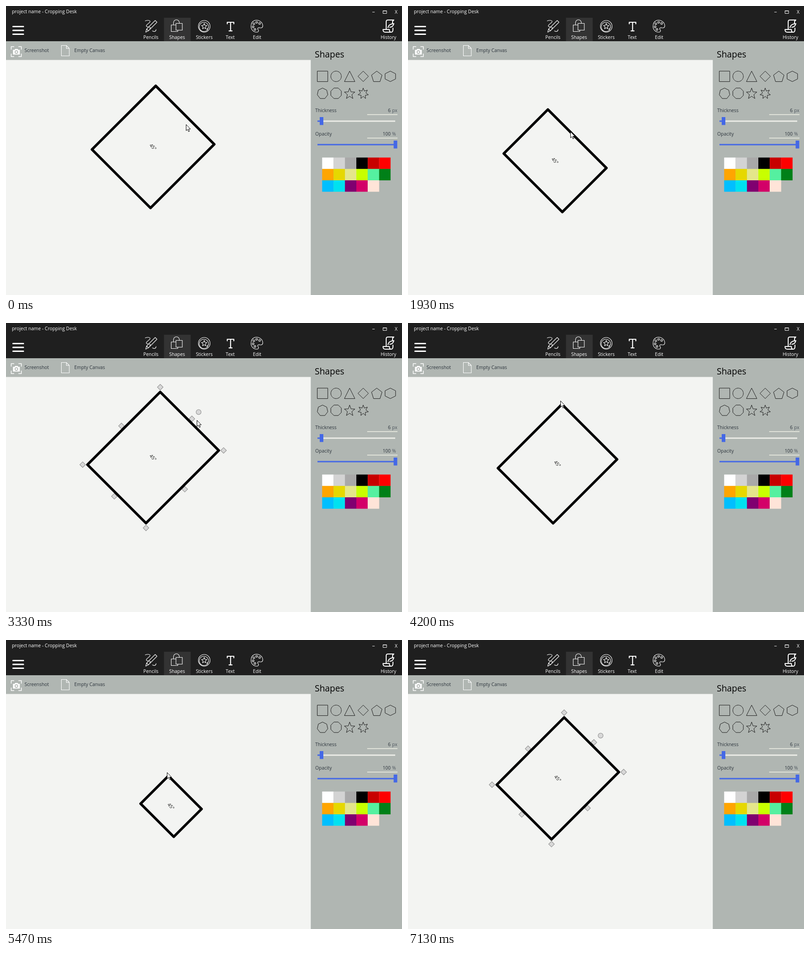
Recreate the animation shown at these times as an HTML page. Size 876 px wide and 640 px high, loop 7540 ms.

```html
<!DOCTYPE html>
<html lang="en">
<head>
<meta charset="utf-8">
<title>Shape editor</title>
<style>
html, body { margin: 0; width: 100%; height: 100%; overflow: hidden; background: #f3f4f2; }
svg { display: block; width: 876px; height: 640px; }
text { font: 10.4px "Open Sans", "Noto Sans", sans-serif; }
.mid { text-anchor: middle; }
.end { text-anchor: end; }
.white { fill: #fff; }
.dark { fill: #2c343c; }
.icon { fill: none; stroke: #fff; stroke-width: 1.1; stroke-linecap: round; stroke-linejoin: round; }
</style>
</head>
<body>
<svg viewBox="0 0 876 640">
  <rect width="876" height="640" fill="#f3f4f2"/>

  <g id="handles" fill="#d8d8d8" stroke="#8a8a8a"></g>
  <rect id="box" fill="#f3f4f2" stroke="#000" stroke-width="5.7" stroke-linejoin="round"/>
  <text id="angle" class="mid" y="4" fill="#111">45°</text>

  <path d="M0 78H876V640H674.200V119.500H0Z" fill="#b0b6b2"/>
  <rect width="876" height="78" fill="#1f1f1f"/>
  <rect x="349.500" y="26" width="59" height="52" fill="#333"/>

  <g class="white">
    <text x="13" y="16">project name - Cropping Desk</text>
    <g class="mid">
      <text x="320.5" y="73">Pencils</text>
      <text x="378.5" y="73">Shapes</text>
      <text x="438.5" y="73">Stickers</text>
      <text x="496" y="73">Text</text>
      <text x="555.5" y="73">Edit</text>
      <text x="846" y="73">History</text>
      <text x="863" y="17">X</text>
    </g>
  </g>
  <path d="M810.5 13.5h5M834 10.5h8v6h-8zM834 11h8" fill="none" stroke="#fff"/>
  <path d="M15.500 45.500h23M15.500 54h23M15.500 62.500h23" stroke="#fff" stroke-width="3" stroke-linecap="round"/>

  <g class="icon">
    <!-- pencils -->
    <path d="M308 33c8-3 14 0 9 4s-10 8-4 9 8 1 5 4M309 58l2-7 19-19 4 4-19 19zM311 51l4 4M324 55c4 3 8 1 8-3"/>
    <!-- shapes -->
    <path d="M370.500 41v-4a6.500 6.500 0 0 1 13 0v1M376 38.500h14v15h-14zM375 42h-9.500v14.500h14.500v-3"/>
    <!-- stickers -->
    <circle cx="438.500" cy="45" r="13"/>
    <path d="M447 51a10.300 10.300 0 1 1 1-3l-4 4"/>
    <!-- text -->
    <path d="M489.500 39.500V36H504V39.500M496.800 36V55M493.500 55.200h6.500" stroke-width="2.200"/>
    <!-- palette -->
    <path d="M550 32c9-3 18 4 18 12 0 5-4 5-8 4-4 0-4 3-2 5s0 5-3 5c-8 0-13-6-13-13 0-6 3-11 8-13z"/>
    <!-- history -->
    <path d="M841 51V35q0-4 4-4h13q-3 1-3 5v4M834 52h14q0 6 4 6t4-6v-3M834 52q0 6 5 6h13M845 48q1-8 13-9-2 8-9 8" stroke-width="2"/>
    <!-- screenshot -->
    <path d="M11.500 96v-6h6M28 90h6v6M34 106v6h-6M17.500 112h-6v-6" stroke-width="1.500"/>
    <!-- file -->
    <path d="M122.500 87.500h11l6.500 6.500v16.500h-17.500zM133.500 87.500v6.500h6.500"/>
  </g>
  <g id="icons" class="icon"></g>
  <path d="M15.500 97h3.500l1.500-2h5l1.500 2h3.500v10.500h-15z" fill="#fff"/>
  <circle cx="23" cy="102" r="3" fill="#fff" stroke="#a4aaa6" stroke-width="1.300"/>

  <g class="dark">
    <text x="41" y="102">Screenshot</text>
    <text x="151" y="102">Empty Canvas</text>
    <text x="684" y="234.500">Thickness</text>
    <text x="684" y="286.500">Opacity</text>
    <text x="851" y="234.500" class="end">6</text>
    <text x="851" y="286.500" class="end">100</text>
    <text x="854" y="234.500" fill="#505860">px</text>
    <text x="854" y="286.500" fill="#505860">%</text>
  </g>
  <text x="683" y="113.500" style="font-size:19.400px">Shapes</text>
  <g id="shapes" fill="none" stroke="#1a1a1a"></g>

  <path d="M799 240.500h67M799 292.500h67" stroke="#f1f2e6" stroke-width="1.500"/>
  <path d="M698 255h163" stroke="#ecede8" stroke-width="3"/>
  <path d="M689 255h6M689 307h170" stroke="#4468e6" stroke-width="3"/>
  <path d="M694 246h8v17.500h-8zM857.500 298h8v17.500h-8z" fill="#4468e6"/>
  <g id="swatches"></g>

  <path id="cursor" d="M.5.5V14l3.100-2.800 2.200 5 2.200-1-2.200-4.700H10z" fill="#fff" stroke="#000"/>
</svg>
<script>
const $ = id => document.getElementById(id);

function set(el, attrs) {
  for (const k in attrs) el.setAttribute(k, attrs[k]);
}
function add(parent, tag, attrs) {
  const el = document.createElementNS("http://www.w3.org/2000/svg", tag);
  set(el, attrs);
  return parent.appendChild(el);
}

// Polygon or star stretched to fill a square; turn is a part of one corner step.
function polygon(parent, cx, cy, size, n, { inner = 1, turn = 0 } = {}) {
  const count = inner < 1 ? 2 * n : n;
  const axes = [Math.sin, a => -Math.cos(a)].map((fn, axis) => {
    const v = Array.from({ length: count }, (_, i) =>
      (i % 2 ? inner : 1) * fn(2 * Math.PI * (i + turn) / count));
    const min = Math.min(...v), max = Math.max(...v);
    return v.map(p => [cx, cy][axis] + size * ((p - min) / (max - min) - 0.5));
  });
  add(parent, "polygon", { points: axes[0].map((x, i) => [x, axes[1][i]]).join(" ") });
}

const shapes = [
  [4, { turn: 0.5 }], [60], [3], [4], [5], [6],
  [7], [8, { turn: 0.5 }], [5, { inner: 0.42 }], [7, { inner: 0.5 }]
];
shapes.forEach(([n, look], i) =>
  polygon($("shapes"), 700.2 + i % 6 * 30, i < 6 ? 155.8 : 193.3, 23.2, n, look));

polygon($("icons"), 438.5, 44.5, 12, 5, { inner: 0.45 });
for (let i = 0; i < 5; i++) {
  const a = 2.1 + i * 0.85;
  add($("icons"), "circle", { cx: 555 + 8.5 * Math.cos(a), cy: 44.5 + 8.5 * Math.sin(a), r: 2 });
}

const colors = `#fff #d3d3d3 #a9a9a9 #000 #c80000 #f00
  #ffa500 #e6d800 #e4e68a #c8ff00 #55f0a0 #008018
  #00bfff #00e1f0 #800070 #d30068 #ffe4d8`.split(/\s+/);
colors.forEach((fill, i) => add($("swatches"), "rect", {
  x: 699.4 + i % 6 * 25.2, y: 335.6 + Math.floor(i / 6) * 25.2,
  width: 25.3, height: 25.3, fill
}));

// Eight resize handles around the box, plus the round one for rotating.
const grips = [];
for (const i of [-1, 0, 1]) for (const j of [-1, 0, 1])
  if (i || j) grips.push({ i, j, el: add($("handles"), "rect", { width: 9, height: 9 }) });
const knob = add($("handles"), "circle", { r: 5.5 });

const LOOP = 7540, FPS = 15;
const RIGHT = 417, BOTTOM = 411.8; // corner that stays fixed before the rotation
const within = (t, a, b) => t >= a && t < b;
const progress = (t, a, b) => Math.min(1, Math.max(0, (t - a) / (b - a)));
const mix = (p, q, f) => p.map((v, i) => v + (q[i] - v) * f);

// Carries a pair of values through moves of the form [begin, end, ...goal].
const follow = (start, moves, t) =>
  moves.reduce((at, [a, b, ...goal]) => mix(at, goal, progress(t, a, b)), start);

// Width and height as the horizontal extent of the tilted sides.
const resizes = [
  [1530, 2400, 129.5, 46.5], [2530, 3190, 129.5, 161],  // edge drag
  [4000, 4200, 122, 141.5], [4200, 4800, 57, 31.5],     // corner drag
  [5270, 6040, 119.8, 147], [6040, 6200, 121, 149]
];
// Distance of the cursor from the grip it is about to drag or has left.
const approach = [[0, 400, 5, 2], [1130, 1400, 0, 0], [6400, 7130, -310, 500]];

function draw(now) {
  const step = Math.floor((now % LOOP + 5) * FPS / 1000);
  const t = Math.round(step * 100 / FPS) * 10;

  const [a, b] = follow([129.5, 141], resizes, t);
  const w = a * Math.SQRT2, h = b * Math.SQRT2;
  const cx = RIGHT - w / 2, cy = BOTTOM - h / 2;
  const turn = `translate(${cx} ${cy}) rotate(45)`;
  set($("box"), { x: -w / 2, y: -h / 2, width: w, height: h, transform: turn });
  set($("angle"), { transform: turn });

  const selected = within(t, 730, 1200) || within(t, 3330, 4070) || t >= 6400;
  set($("handles"), { transform: turn, visibility: selected ? "visible" : "hidden" });
  for (const { i, j, el } of grips)
    set(el, { x: i * (w / 2 + 7.5) - 4.5, y: j * (h / 2 + 7.5) - 4.5 });
  set(knob, { cy: -h / 2 - 28.5 });

  // The cursor holds the upper right edge first and the top corner later.
  const edge = [261 + b, 376 - b];
  const corner = [cx + (b - a) / 2 - 3, cy - (a + b) / 2 - 8];
  const f = progress(t, 3330, 3670);
  const grip = mix(edge, corner, f * f * (3 - 2 * f));
  const gap = follow([-4, 27], approach, t);
  set($("cursor"), { transform: `translate(${grip.map((v, i) => Math.round(v + gap[i]))})` });
  requestAnimationFrame(draw);
}
draw(0);
</script>
</body>
</html>
```
